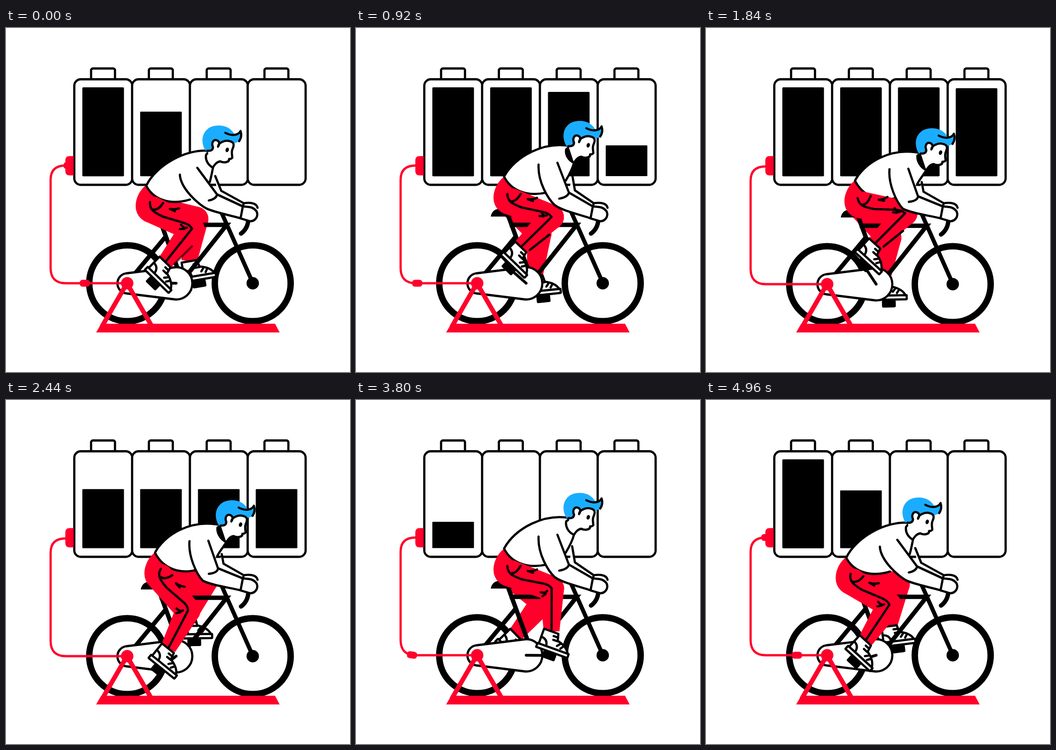
An HTML page without scripts for the animation above (5000 ms loop, 748 by 748 pixels).

```html
<!DOCTYPE html>
<html lang="en">
<head>
<meta charset="utf-8">
<title>Pedal power</title>
<style>
@property --a { syntax: "<angle>"; inherits: true; initial-value: 180deg; }
@property --hx { syntax: "<number>"; inherits: true; initial-value: 318; }
@property --hy { syntax: "<number>"; inherits: true; initial-value: 388; }
@property --b { syntax: "<number>"; inherits: true; initial-value: 0; }

html, body { margin: 0; width: 100%; height: 100%; overflow: hidden; background: #fff; }
svg {
  display: block; width: 100vw; height: 100vh;
  --red: #ff002b;
  animation: crank 5s linear infinite, pose 5s ease-in-out infinite;
}
.ink { fill: none; stroke: #000; stroke-width: 4.8; stroke-linecap: round; stroke-linejoin: round; }
.ink.skin { fill: #fff; }
.red { fill: var(--red); }
.wire { fill: none; stroke: var(--red); }

@keyframes crank {
  0% { --a: 180deg; }
  18.4% { --a: 581deg; }
  36.8% { --a: 956deg; }
  60.8% { --a: 1487deg; }
  76% { --a: 1800deg; }
  85.6% { --a: 2015deg; }
  99.2% { --a: 2323deg; }
  100% { --a: 2340deg; }
}

/* Three rider poses: seated back, risen, dipped */
@keyframes pose {
  0%, 99.2%, 100% { --hx: 318; --hy: 388; --b: 0; }
  18.4%, 30.8%, 42.8%, 54.8%, 66.8%, 76%, 85.6% { --hx: 335; --hy: 370; --b: 0; }
  9.2%, 24.8%, 36.8%, 48.8%, 60.8%, 71.4%, 80.8%, 92% { --hx: 337; --hy: 378; --b: 2; }
}
@keyframes head {
  0%, 99.2%, 100% { transform: translate(-24px, 10px); }
  18.4%, 30.8%, 42.8%, 54.8%, 66.8%, 76%, 85.6% { transform: none; }
  9.2%, 24.8%, 36.8%, 48.8%, 60.8%, 71.4%, 80.8%, 92% { transform: translate(5px, 16px); }
}
@keyframes torso {
  0%, 99.2%, 100% { d: path("M443 335C446 325 448 314 450 304C440 298 433 288 435 276L442 267C390 262 325 300 305 343C318 368 350 388 400 373"); }
  18.4%, 30.8%, 42.8%, 54.8%, 66.8%, 76%, 85.6% { d: path("M456 332C462 322 470 308 474 293C462 288 455 276 457 264L466 257C410 246 346 278 322 323C335 350 367 368 414 358"); }
  9.2%, 24.8%, 36.8%, 48.8%, 60.8%, 71.4%, 80.8%, 92% { d: path("M459 340C465 328 474 318 479 309C466 303 458 288 460 277L471 273C400 256 342 296 324 332C337 358 368 382 416 369"); }
}
@keyframes arm {
  0%, 99.2%, 100% { d: path("M378 319C380 350 420 385 437 393C452 400 482 406 511 414L515 388L459 362L416 304M441 375Q457 372 459 362"); }
  18.4%, 30.8%, 42.8%, 54.8%, 66.8%, 76%, 85.6% { d: path("M397 297C395 335 418 372 432 385C446 396 480 404 511 414L515 388L463 358L438 293M442 371Q460 368 463 358"); }
  9.2%, 24.8%, 36.8%, 48.8%, 60.8%, 71.4%, 80.8%, 92% { d: path("M399 307C396 340 414 378 428 393C446 402 480 407 511 414L515 388L461 366L440 306M441 378Q460 376 461 366"); }
}
@keyframes far-arm {
  0%, 99.2%, 100% { d: path("M455 322L468 354L517 381L515 388L459 362"); }
  18.4%, 30.8%, 42.8%, 54.8%, 66.8%, 76%, 85.6% { d: path("M470 318L476 353L517 381L515 388L463 358"); }
  9.2%, 24.8%, 36.8%, 48.8%, 60.8%, 71.4%, 80.8%, 92% { d: path("M469 335L473 356L517 381L515 388L461 366"); }
}
.head, .torso, .arm, .far-arm { animation: head 5s ease-in-out infinite; }
.torso { animation-name: torso; }
.arm { animation-name: arm; }
.far-arm { animation-name: far-arm; }

/* Two-bone leg: hip (hx, hy), thigh 99, shin 92, ankle held by the tilted shoe */
.leg {
  --px: calc(370 + 50 * cos(var(--p)));
  --py: calc(555 + var(--b) + 50 * sin(var(--p)));
  --ax: calc(var(--px) - 13 * cos(var(--tilt)) + 52 * sin(var(--tilt)));
  --ay: calc(var(--py) - 13 * sin(var(--tilt)) - 52 * cos(var(--tilt)));
  --dx: calc(var(--ax) - var(--hx));
  --dy: calc(var(--ay) - var(--hy));
  --d: hypot(var(--dx), var(--dy));
  --thigh: calc(atan2(var(--dy), var(--dx)) - acos((1337 + var(--d) * var(--d)) / (198 * var(--d))));
  --kx: calc(var(--hx) + 99 * cos(var(--thigh)));
  --ky: calc(var(--hy) + 99 * sin(var(--thigh)));
  --shin: atan2(var(--ay) - var(--ky), var(--ax) - var(--kx));
}
.near { --p: var(--a); --tilt: calc(32deg - 13deg * cos(var(--p) - 20deg)); }
.far { --p: calc(var(--a) + 180deg); --tilt: calc(18deg - 28deg * cos(var(--p) - 10deg)); }
.bike { transform: translateY(calc(var(--b) * 1px)); }
.pelvis { transform: translate(calc(var(--hx) * 1px), calc(var(--hy) * 1px)); }
.crank { transform: translate(370px, calc((555 + var(--b)) * 1px)) rotate(var(--p)); }
.thigh { transform: translate(calc(var(--hx) * 1px), calc(var(--hy) * 1px)) rotate(var(--thigh)); }
.shin { transform: translate(calc(var(--kx) * 1px), calc(var(--ky) * 1px)) rotate(var(--shin)); }
.shoe { transform: translate(calc(var(--px) * 1px), calc(var(--py) * 1px)) rotate(var(--tilt)); }
.edge { opacity: calc(6 * cos(var(--a) - 215deg) - 4.4); }

.fill { transform-origin: 0 322px; animation: fill1 5s linear infinite; }
.fill.n2 { animation-name: fill2; }
.fill.n3 { animation-name: fill3; }
.fill.n4 { animation-name: fill4; }
@keyframes fill1 {
  0%, 45.6% { transform: scaleY(1); }
  55.2%, 69.8% { transform: scaleY(0); }
  76% { transform: scaleY(.295); }
  85.6% { transform: scaleY(.803); }
  92%, 100% { transform: scaleY(1); }
}
@keyframes fill2 {
  0% { transform: scaleY(.725); }
  5.2%, 45.6% { transform: scaleY(1); }
  55.2%, 85.2% { transform: scaleY(0); }
  85.6% { transform: scaleY(.015); }
  99.2% { transform: scaleY(.648); }
  100% { transform: scaleY(.725); }
}
@keyframes fill3 {
  0%, 1.2% { transform: scaleY(0); }
  18.4% { transform: scaleY(.948); }
  20.4%, 45.6% { transform: scaleY(1); }
  55.2%, 100% { transform: scaleY(0); }
}
@keyframes fill4 {
  0%, 13.6% { transform: scaleY(0); }
  18.4% { transform: scaleY(.345); }
  28% { transform: scaleY(.85); }
  36.8% { transform: scaleY(.99); }
  39.2%, 45.6% { transform: scaleY(1); }
  55.2%, 100% { transform: scaleY(0); }
}

.pulse {
  offset-path: path("M263 555H130Q97 555 97 522V330Q97 299 130 299H139");
  offset-rotate: auto;
  animation: pulse 5s linear infinite;
}
@keyframes pulse {
  0% { offset-distance: 0%; opacity: 1; }
  2.8% { offset-distance: 21%; }
  4.5% { offset-distance: 32%; }
  14.1% { offset-distance: 96%; }
  17% { offset-distance: 100%; }
  18% { offset-distance: 100%; opacity: 1; }
  19%, 100% { offset-distance: 100%; opacity: 0; }
}
</style>
</head>
<body>
<svg viewBox="0 0 748 748">
  <defs>
    <g id="battery" class="ink">
      <rect x="185" y="88" width="52" height="26" rx="4"/>
      <rect x="148.500" y="111.500" width="126" height="229.500" rx="14" fill="#fff"/>
    </g>
    <rect id="level" x="166" y="129" width="90.500" height="193.500" rx="2"/>
    <g id="leg">
      <path class="ink crank" d="M0 0H50" style="stroke-width:6"/>
      <path class="red thigh" d="M0 -23L99 -27A27 27 0 0 1 99 27L0 36A30 30 0 0 1 0 -23Z"/>
      <path class="red shin" d="M0 -27L93 -17V17L0 27A27 27 0 0 1 0 -27Z"/>
      <g class="shoe">
        <rect x="-15" y="-7" width="30" height="16" rx="3"/>
        <g class="ink">
          <path fill="#fff" d="M-30 -16L-30 -51H3L7 -36Q30 -31 37 -16Z"/>
          <path d="M4 -43H-5M7 -35H-3M14 -31L9 -25M22 -28L18 -22M-30 -33Q-14 -32 -13 -16"/>
          <rect x="-33" y="-17" width="72" height="9" rx="1" fill="#fff"/>
        </g>
      </g>
    </g>
  </defs>

  <use href="#battery"/>
  <use href="#battery" x="125.700"/>
  <use href="#battery" x="251.400"/>
  <use href="#battery" x="377"/>
  <g class="fill"><use href="#level"/></g>
  <g class="fill n2"><use href="#level" x="125.700"/></g>
  <g class="fill n3"><use href="#level" x="251.400"/></g>
  <g class="fill n4"><use href="#level" x="377"/></g>
  <path class="red" d="M147 278.500H138Q129 278.500 129 288V311Q129 320.500 138 320.500H147Z"/>

  <g class="bike" fill="none" stroke="#000" stroke-width="14">
    <circle cx="263.500" cy="555" r="82.500"/>
    <circle cx="536.500" cy="555" r="82.500"/>
  </g>

  <g class="leg far"><use href="#leg"/></g>

  <g class="bike">
    <g fill="none" stroke="#000" stroke-width="9.500">
      <path d="M328 400L374 525M346 455L263 555M334 428H480L385 548"/>
      <path d="M468 400L537 555" stroke-width="9"/>
      <path d="M527 416Q526 436 511 447" stroke-linecap="round"/>
    </g>
    <circle cx="536.500" cy="555" r="13.500"/>
    <path d="M293 410Q296 394 312 393L334 397L340 410Z"/>
    <path class="ink skin" d="M261 533.500L366 520.500A35 35 0 1 1 366 590L261 577A22 22 0 0 1 261 533.500Z"/>
    <path class="wire" stroke-width="4.800" d="M263 555H130Q97 555 97 522V330Q97 299 130 299H139"/>
    <g class="red">
      <rect class="pulse" x="-11" y="-7.500" width="22" height="15" rx="6" style="animation-delay:-1.425s"/>
      <rect class="pulse" x="-11" y="-7.500" width="22" height="15" rx="6" style="animation-delay:-.825s"/>
      <rect class="pulse" x="-11" y="-7.500" width="22" height="15" rx="6" style="animation-delay:-.138s"/>
      <rect class="pulse" x="-11" y="-7.500" width="22" height="15" rx="6" style="animation-delay:-4.285s"/>
    </g>
    <path class="wire" stroke-width="10" d="M208 650L263 555L318 650"/>
    <circle class="red" cx="263.500" cy="555" r="13.500"/>
  </g>
  <path class="red" d="M196 662L207 643H585L595 662Z"/>

  <path class="red pelvis" d="M-13 -47C-30 -33 -36 -15 -36 0A36 36 0 0 0 36 0L30 -10C10 -18 -5 -30 -13 -47Z"/>
  <path class="ink skin far-arm" d="M455 322L468 354L517 381L515 388L459 362"/>
  <path class="ink" d="M517 381C530 379 545 380 547 391"/>
  <path class="ink skin torso" d="M443 335C446 325 448 314 450 304C440 298 433 288 435 276L442 267C390 262 325 300 305 343C318 368 350 388 400 373"/>

  <g class="head">
    <path fill="#1aadff" d="M458 257C443 234 453 202 486 202C504 202 514 210 520 220Q530 220 534 214Q539 228 528 238L519 241L485 250Z"/>
    <path class="ink" d="M501 218C514 225 529 224 534 214Q538 226 531 236"/>
    <path class="ink skin" d="M462 257Q474 258 474 249C470 240 475 232 482 234C490 237 488 244 485 248C485 240 500 233 510 236C519 238 521 243 517 252C513 260 516 266 516 272Q514 275 509 275C510 282 498 284 490 280C482 281 478 287 474 293"/>
    <ellipse cx="505" cy="255" rx="3.600" ry="5" transform="rotate(18 505 255)"/>
  </g>

  <g class="leg near">
    <use href="#leg"/>
    <g class="ink">
      <path class="thigh" d="M-9 -6C-2 10 12 9 31 8L80 -3Q92 -5 99 0M17 -18Q16 2 3 6M36 -14Q46 -17 53 -25M36 -14L48 -15"/>
      <path class="shin" d="M0 0L89 0M5 10Q11 13 8 24M11 13L17 20"/>
      <g class="edge"><path class="shin" d="M30 -24L84 -18"/></g>
    </g>
  </g>

  <path class="ink skin arm" d="M378 319C380 350 420 385 437 393C452 400 482 406 511 414L515 388L459 362L416 304M441 375Q457 372 459 362"/>
  <path class="ink skin" d="M515 388C530 389 538 389 545 399C550 411 540 421 530 420L510 414Z"/>
</svg>
</body>
</html>
```
